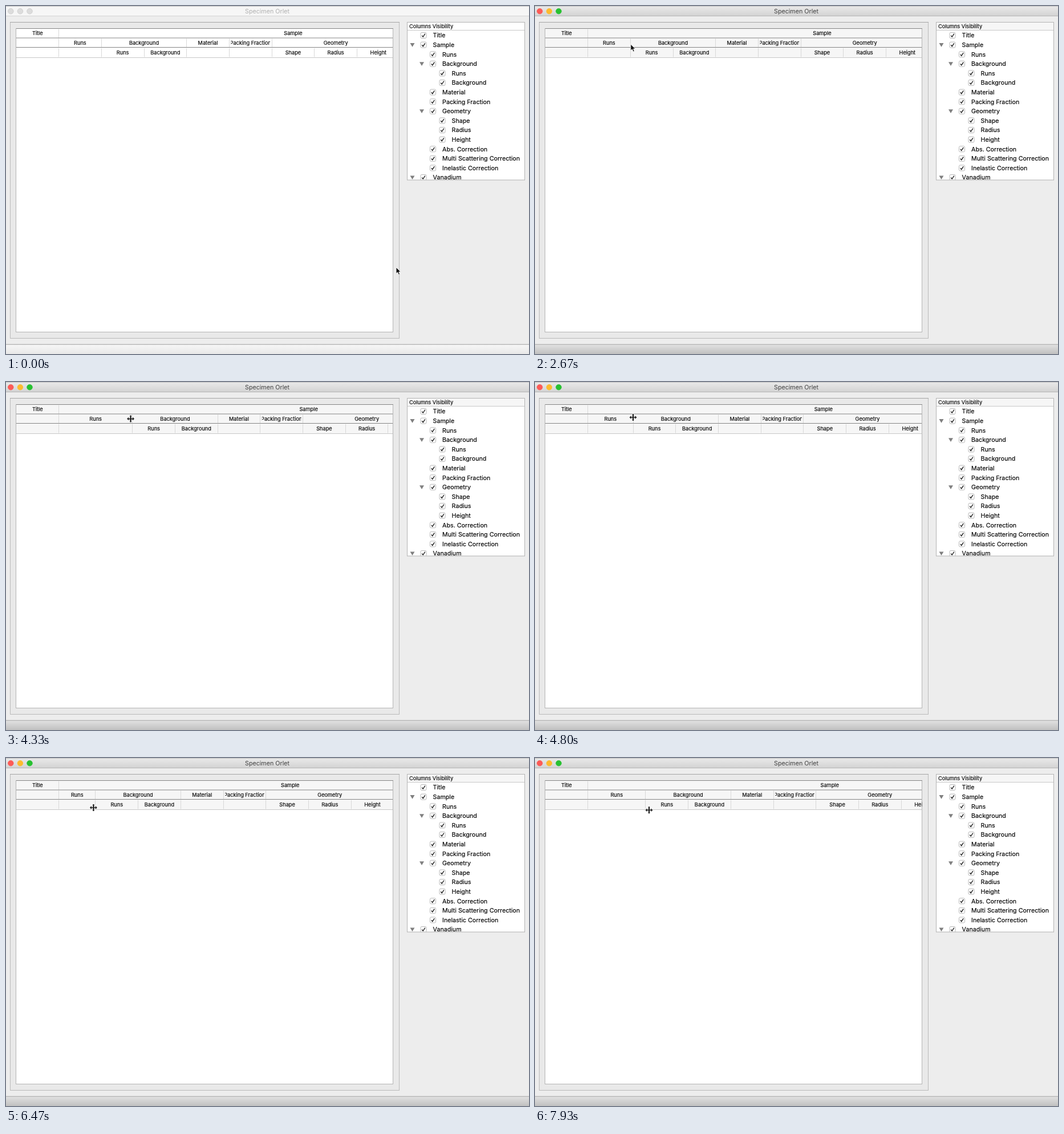
An HTML page for the animation above (8000 ms loop, 917 px wide and 610 px high).

```html
<!DOCTYPE html>
<html lang="en">
<head>
<meta charset="utf-8">
<title>Column resizing</title>
<style>
  html, body { margin: 0; width: 100%; height: 100%; overflow: hidden; background: #ededed; }
  #stage { display: block; width: 917px; height: 610px; }
  text { font: 9.2px Inter, Roboto, sans-serif; fill: #000; stroke: #000; stroke-width: .15px; }
  .big { font-size: 10.7px; }
  .mid { text-anchor: middle; }
  .bar { fill: #f6f6f6; }
  .foot { fill: url(#paleFoot); }
  .head { fill: #fff; }
  .edge { stroke: #d4d4d4; }
  .light { fill: #dcdcdc; stroke: #cbcbcb; stroke-width: .8px; }
  .caption { fill: #b0b0b0; stroke: none; }
  .on .bar { fill: url(#metal); }
  .on .foot { fill: url(#metalFoot); }
  .on .head { fill: #f6f6f6; }
  .on .edge { stroke: #b4b4b4; }
  .on .caption { fill: #404040; }
  .on .light { fill: var(--c); stroke: var(--c); }
</style>
</head>
<body>
<svg id="stage" viewBox="0 0 917 610">
  <defs>
    <linearGradient id="metal" x2="0" y2="1">
      <stop stop-color="#eaeaea"/><stop offset="1" stop-color="#d2d2d2"/>
    </linearGradient>
    <linearGradient id="metalFoot" x2="0" y2="1">
      <stop stop-color="#e0e0e0"/><stop offset="1" stop-color="#c0c0c0"/>
    </linearGradient>
    <linearGradient id="paleFoot" x2="0" y2="1">
      <stop stop-color="#f6f6f6"/><stop offset="1" stop-color="#e8e8e8"/>
    </linearGradient>
  </defs>

  <rect width="917" height="610" fill="#ededed"/>
  <rect class="bar" width="917" height="18"/>
  <path d="M0 .5H917" stroke="#c4c4c4"/>
  <path class="edge" d="M0 17.5H917"/>
  <g id="lights"></g>
  <text class="big mid caption" x="458" y="13.3">Specimen Orlet</text>

  <rect class="foot" y="594" width="917" height="16"/>
  <path d="M0 593.2H917" stroke="#a0a0a0"/>

  <rect x="7.5" y="28.5" width="682" height="554" fill="#e9e9e9" stroke="#bababa"/>
  <path d="M7 28.5H690" stroke="#a4a4a4"/>
  <rect x="17.5" y="39.5" width="661" height="532" fill="#fff" stroke="#b4b4b4"/>
  <rect class="head" x="18" y="40" width="660" height="50"/>
  <svg id="table" width="678.5" height="571"></svg>
  <path d="M18 39.5H679M18 56H678M18 72.5H678" stroke="#858585"/>
  <path d="M18 90.5H678" stroke="#c8c8c8"/>

  <rect x="703.5" y="28.5" width="206" height="276" fill="#fff"/>
  <rect class="head" x="704" y="29" width="205" height="13"/>
  <path d="M704 42.5H909" stroke="#c8c8c8"/>
  <text x="707" y="38.8">Columns Visibility</text>
  <svg id="tree" width="909" height="304.8"></svg>
  <rect x="703.5" y="28.5" width="206" height="276.5" fill="none" stroke="#b4b4b4"/>

  <path id="arrow" d="M0 0V11.2L2.6 8.8 4.6 13.2 6.6 12.3 4.8 8.1H8.2Z" fill="#111" stroke="#fff" stroke-width=".9"/>
  <path id="split" d="M-6.5 0L-3.4-3V-.8H-1.2V-6H1.2V-.8H3.4V-3L6.5 0 3.4 3V.8H1.2V6H-1.2V.8H-3.4V3Z"
    fill="#222" stroke="#fff" stroke-width="1.2" paint-order="stroke"/>
</svg>

<script>
const $ = id => document.getElementById(id);

function add(parent, tag, attrs, text) {
  const el = document.createElementNS('http://www.w3.org/2000/svg', tag);
  for (const name in attrs) el.setAttribute(name, attrs[name]);
  if (text) el.textContent = text;
  return parent.appendChild(el);
}

['#fc5b57', '#fdbb2e', '#28c131'].forEach((color, i) =>
  add($('lights'), 'circle', { class: 'light', cx: 8.3 + 16.6 * i, cy: 9.2, r: 4.8, style: `--c:${color}` }));

// One outline feeds both the tree and the three header rows
const outline = [
  ['Title'],
  ['Sample', [
    ['Runs'],
    ['Background', [['Runs'], ['Background']]],
    ['Material'],
    ['Packing Fraction'],
    ['Geometry', [['Shape'], ['Radius'], ['Height']]],
    ['Abs. Correction'],
    ['Multi Scattering Correction'],
    ['Inelastic Correction']
  ]],
  ['Vanadium', []]
];
const PITCH = 16.6, COL = 74.7, HEAD_ROWS = 3;
const cells = [];
let treeRow = 0, leaf = 0;

function addTreeRow(label, depth, open) {
  const y = 51.5 + PITCH * treeRow++;
  const row = add($('tree'), 'g', { transform: `translate(${732 + 16.5 * depth} ${y})` });
  add(row, 'rect', { x: -5, y: -5, width: 10, height: 10, rx: 2, fill: '#fff', stroke: '#b8b8b8' });
  add(row, 'path', { d: 'M-2.7.2L-.8 2.6 2.8-2.8', fill: 'none', stroke: '#222', 'stroke-width': 1.4 });
  if (open) add(row, 'path', { d: 'M-23.5-3H-15.5L-19.5 3.6Z', fill: '#808080' });
  add(row, 'text', { class: 'big', x: 16.6, y: 3.9 }, label);
}

function addCell(row, col, span, label) {
  const y = 39.7 + PITCH * row;
  const line = add($('table'), 'path', { stroke: '#d8d8d8' });
  const box = add($('table'), 'svg', { y, height: PITCH });
  add(box, 'text', { class: 'mid', x: '50%', y: 11.7 }, label);
  cells.push({ y, col, span, line, box });
}

function build([label, kids], depth = 0) {
  const first = leaf;
  addTreeRow(label, depth, kids);
  if (kids && kids.length) {
    kids.forEach(kid => build(kid, depth + 1));
  } else {
    leaf++;
    for (let row = depth + 1; row < HEAD_ROWS; row++) addCell(row, first, 1);
  }
  addCell(depth, first, leaf - first, label);
}
outline.forEach(node => build(node));

function layout(divider) {
  const edge = i => i < 2 ? 18 + 74.5 * i : divider + (i - 2) * COL;
  for (const { y, col, span, line, box } of cells) {
    const left = edge(col), right = edge(col + span);
    box.setAttribute('x', left + 3);
    box.setAttribute('width', right - left - 6);
    line.setAttribute('d', `M${Math.floor(right) + .5} ${y + 1}v${PITCH - 1}`);
  }
}

// Pointer moves: first tick, last tick, end x, end y; 15 ticks per second
const home = [684, 458];
const moves = [
  [4, 8, 300, 197], [11, 21, 170, 67], [24, 27, 166.5, 68], [39, 40, 167.7, 67], [47, 48, 169, 69.5],
  [50, 63, 225.3, 65], [63, 72, 172, 62], [75, 84, 171, 86], [86, 88, 172.6, 86],
  [91, 109, 98.5, 90], [111, 119, 200, 91.3]
];
const smooth = f => f * f * (3 - 2 * f);

function pointer(tick) {
  let [x, y] = home;
  for (const [from, to, endX, endY] of moves) {
    const f = smooth(Math.min(1, Math.max(0, (tick - from) / (to - from))));
    x += (endX - x) * f;
    y += (endY - y) * f;
  }
  return [x, y];
}

// While dragged, the divider trails the pointer by a tick and stops at a minimum width
function dividerX(tick) {
  const held = tick < 51 ? 50 : tick > 73 && tick < 92 ? 90 : tick - 1;
  return Math.max(117.5, pointer(held)[0] - 1.7);
}

function draw(now) {
  const tick = Math.floor((now % 8000 + 4) * 15 / 1000) % 120;
  const resizing = tick >= 48 && tick < 74 || tick >= 87;
  $('stage').classList.toggle('on', tick >= 32);
  layout(dividerX(tick));
  const [shown, hidden] = resizing ? ['split', 'arrow'] : ['arrow', 'split'];
  $(shown).setAttribute('transform', `translate(${pointer(tick)})`);
  $(shown).style.display = '';
  $(hidden).style.display = 'none';
}

const start = performance.now();
function loop() {
  draw(performance.now() - start);
  requestAnimationFrame(loop);
}
loop();
</script>
</body>
</html>
```
